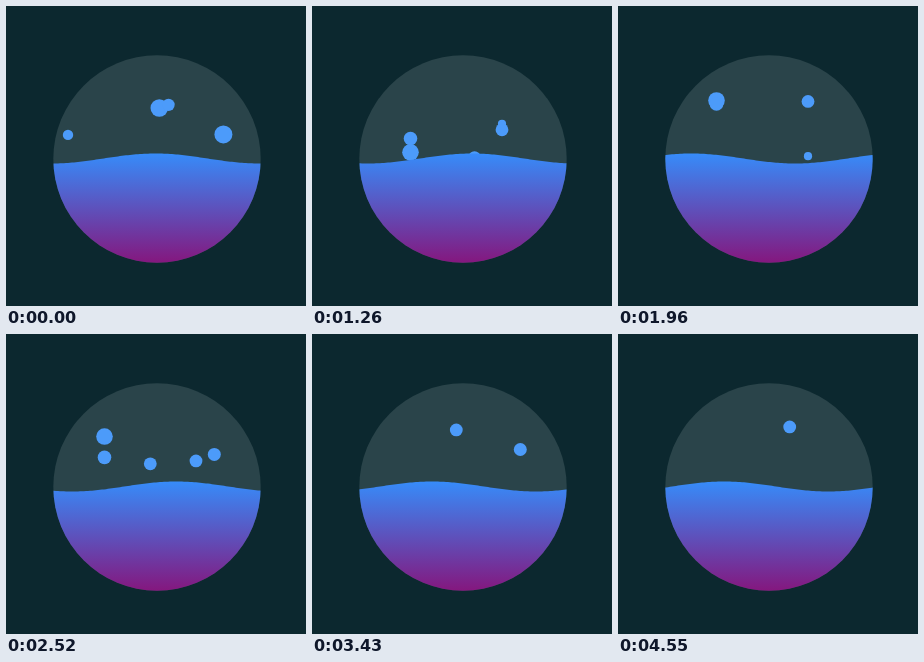
Animation of 300x300 px, one loop 4.62 s. Source, as an HTML page:

```html
<!DOCTYPE html>
<html lang="en">
<head>
<meta charset="utf-8">
<title>Liquid bubbles</title>
<style>
  html, body { margin: 0; width: 100%; height: 100%; overflow: hidden; background: #0c282f; }
  svg { display: block; width: 100%; height: 100%; }
</style>
</head>
<body>
<svg viewBox="0 0 300 300">
  <defs>
    <clipPath id="bowl"><circle cx="151" cy="153" r="103.7"/></clipPath>
    <linearGradient id="liquid" gradientUnits="userSpaceOnUse" x1="0" y1="147" x2="0" y2="256">
      <stop offset="0" stop-color="#368cfa"/>
      <stop offset="1" stop-color="#84187f"/>
    </linearGradient>
  </defs>
  <rect width="300" height="300" fill="#0c282f"/>
  <circle cx="151" cy="153" r="103.7" fill="#2a444a"/>
  <g clip-path="url(#bowl)">
    <g id="bubbles" fill="#4c9bfa"></g>
    <path id="wave" fill="url(#liquid)"/>
  </g>
</svg>
<script>
const LOOP = 4620, STEP = 70;
const WAVE = { length: 208, period: 1.2, level: 152.5, height: 5, crest: 149.5 };

// top: highest centre, at: time of the top, up/down: seconds of rise and fall
const bubbles = [
  { x: 62, r: 5.2, top: 122, low: 165, at: 0.34, up: 0.74, down: 0.74 },
  { x: 153.3, r: 8.8, top: 90, low: 171, at: -0.23, up: 1.75, down: 1.75 },
  { x: 162.5, r: 6.2, top: 93, low: 171, at: 0.18, up: 0.54, down: 2.4 },
  { x: 217.4, r: 9, top: 100, low: 171, at: -0.246, up: 1, down: 1 },
  { x: 190, r: 4.1, top: 112, low: 165, at: 1.02, up: 0.84, down: 2.2 },
  { x: 190, r: 6.4, top: 94.5, low: 171, at: 2.16, up: 1.4, down: 1.4 },
  { x: 98.5, r: 8.3, top: 90, low: 171, at: 2.361, up: 1.383, down: 1.18 },
  { x: 98.5, r: 6.8, top: 96.5, low: 171, at: 2.2, up: 1.346, down: 1.4 },
  { x: 144.3, r: 6.4, top: 94, low: 171, at: 3.815, up: 1.88, down: 1.2 },
  { x: 208.3, r: 6.5, top: 89.5, low: 171, at: 3.205, up: 1.07, down: 1.07 },
  { x: 171.7, r: 6.4, top: 92, low: 171, at: 4.75, up: 1.4, down: 1.4 }
];

const bezier = (s, a, b) => 3 * a * s * (1 - s) ** 2 + 3 * b * s * s * (1 - s) + s ** 3;

// The CSS "ease" curve
function ease(u) {
  if (u <= 0) return 0;
  if (u >= 1) return 1;
  let lo = 0, hi = 1;
  for (let i = 0; i < 20; i++) {
    const mid = (lo + hi) / 2;
    if (bezier(mid, 0.25, 0.25) < u) lo = mid; else hi = mid;
  }
  return bezier(lo, 0.1, 1);
}

function bubbleY(b, t) {
  const d = t - b.at;
  const drop = d < 0 ? 1 - ease(1 + d / b.up) : ease(d / b.down);
  return b.top + (b.low - b.top) * drop;
}

function wavePath(t) {
  const crest = WAVE.crest + WAVE.length * t / WAVE.period;
  let d = "M44 260";
  for (let x = 44; x <= 258; x += 2) {
    const y = WAVE.level - WAVE.height * Math.cos(2 * Math.PI * (x - crest) / WAVE.length);
    d += `L${x} ${y.toFixed(2)}`;
  }
  return d + "L258 260Z";
}

const group = document.getElementById("bubbles");
const wave = document.getElementById("wave");
const dots = bubbles.map(b => {
  const dot = document.createElementNS("http://www.w3.org/2000/svg", "circle");
  dot.setAttribute("cx", b.x);
  dot.setAttribute("r", b.r);
  return group.appendChild(dot);
});

function draw(ms) {
  const t = Math.floor((ms % LOOP) / STEP) * STEP / 1000;
  bubbles.forEach((b, i) => dots[i].setAttribute("cy", bubbleY(b, t).toFixed(2)));
  wave.setAttribute("d", wavePath(t));
}

const start = performance.now();
function tick() {
  draw(performance.now() - start);
  requestAnimationFrame(tick);
}
tick();
</script>
</body>
</html>
```
